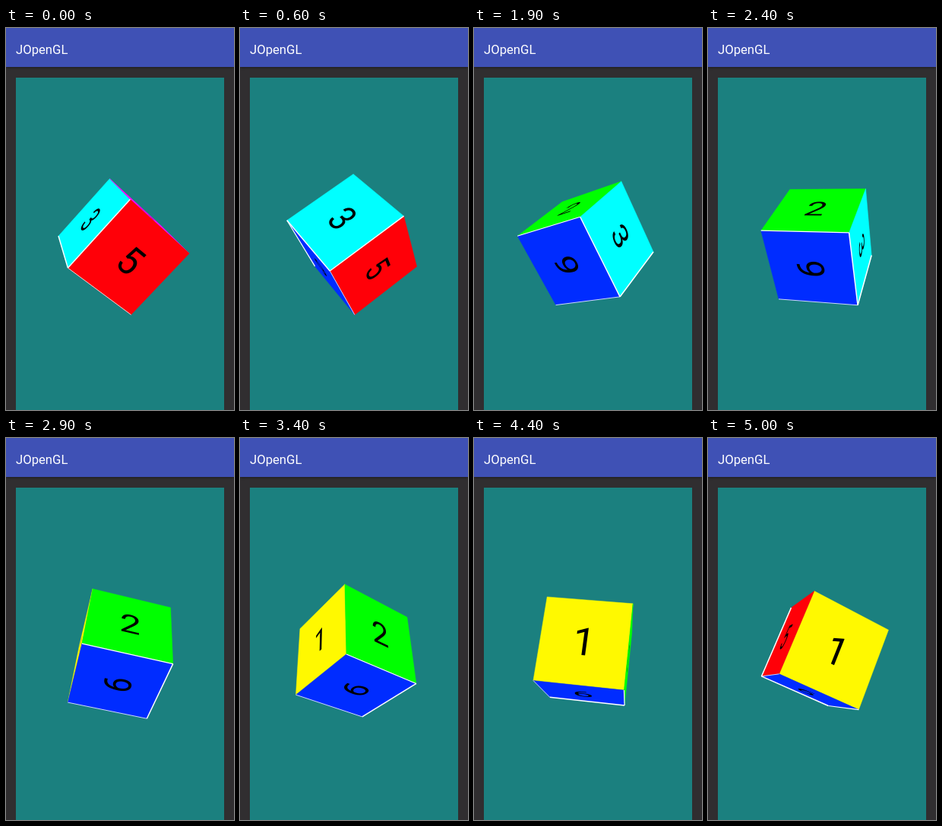
Write an HTML page with a canvas that moves like this. It is 300 px wide and 500 px high and loops after 5.1 s.

```html
<!DOCTYPE html>
<html lang="en">
<head>
<meta charset="utf-8">
<title>JOpenGL</title>
<style>
  html, body { margin: 0; width: 100%; height: 100%; overflow: hidden; background: #302e30; }
  header {
    position: absolute; left: 0; top: 0; width: 300px; height: 51px; box-sizing: border-box;
    padding-left: 13px; background: #3f51b5; color: #fff;
    font: 16.67px/58px Roboto, sans-serif; box-shadow: 0 1px 3px rgba(0, 0, 0, .4);
  }
  canvas { position: absolute; left: 13px; top: 65px; background: #1b807f; }
</style>
</head>
<body>
<header>JOpenGL</header>
<canvas id="view" width="274" height="435"></canvas>
<script>
const LOOP = 5100, STEP = 100;
const FOCAL = 532, DISTANCE = 10, CENTER = [137, 218];
const ctx = document.getElementById('view').getContext('2d');

// Orientation over time: ms, then quaternion w, x, y, z
const poses = [
  [0, .402, .035, .221, .888],
  [600, .243, .210, .383, .866],
  [1300, .047, .384, .543, .745],
  [1900, -.118, .493, .628, .591],
  [2900, -.343, .592, .700, .206],
  [3900, -.484, .518, .668, -.226],
  [5000, -.494, .267, .542, -.625]
];

// Each face: digit, colour, text direction and downward direction on the cube
const faces = [
  ['1', '#fff900', [0, 0, -1], [1, 0, 0]],
  ['2', '#00ff00', [0, 1, 0], [1, 0, 0]],
  ['3', '#00ffff', [0, 0, 1], [1, 0, 0]],
  ['4', '#ff00ff', [0, 0, -1], [0, -1, 0]],
  ['5', '#ff0008', [0, -1, 0], [1, 0, 0]],
  ['6', '#002cff', [0, 0, -1], [0, 1, 0]]
];

// Pale seams: the two face normals that meet there, and the line width
const seams = [
  [[0, 1, 0], [0, 0, 1], 1.5],
  [[1, 0, 0], [0, 1, 0], 1.5],
  [[1, 0, 0], [0, 0, -1], 1.2],
  [[1, 0, 0], [0, 0, 1], .8]
];

const cross = (a, b) => [
  a[1] * b[2] - a[2] * b[1],
  a[2] * b[0] - a[0] * b[2],
  a[0] * b[1] - a[1] * b[0]
];
const mix = (a, b, c, s, t) => a.map((v, i) => v + b[i] * s + c[i] * t);

// Cubic through the four poses around t, then normalised
function orientation(t) {
  let i = 0;
  while (i < poses.length - 2 && poses[i + 1][0] <= t) i++;
  const first = Math.max(0, Math.min(poses.length - 4, i - 1));
  const near = poses.slice(first, first + 4);
  const q = [0, 0, 0, 0];
  for (const p of near) {
    let weight = 1;
    for (const o of near) if (o !== p) weight *= (t - o[0]) / (p[0] - o[0]);
    for (let k = 0; k < 4; k++) q[k] += weight * p[k + 1];
  }
  const size = Math.hypot(...q);
  return q.map(v => v / size);
}

function rotate([w, ...axis], v) {
  const c = cross(axis, v);
  return mix(v, c, cross(axis, c), 2 * w, 2);
}

function project([x, y, z]) {
  const s = FOCAL / (DISTANCE - z);
  return [CENTER[0] + x * s, CENTER[1] + y * s];
}

const facesViewer = normal => normal[2] * DISTANCE > 1;

function drawFace(digit, color, right, down) {
  const normal = cross(right, down);
  if (!facesViewer(normal)) return;
  ctx.beginPath();
  for (const [s, t] of [[-1, -1], [1, -1], [1, 1], [-1, 1]])
    ctx.lineTo(...project(mix(normal, right, down, s, t)));
  ctx.closePath();
  ctx.fillStyle = ctx.strokeStyle = color;
  ctx.lineWidth = .5;
  ctx.fill();
  ctx.stroke();

  const h = .3;
  const slope = (s, t) => {
    const a = project(mix(normal, right, down, -s, -t));
    const b = project(mix(normal, right, down, s, t));
    return [(b[0] - a[0]) / (200 * h), (b[1] - a[1]) / (200 * h)];
  };
  ctx.save();
  ctx.transform(...slope(h, 0), ...slope(0, h), ...project(normal));
  ctx.fillStyle = '#000';
  ctx.fillText(digit, 0, 32);
  ctx.restore();
}

function drawSeam(a, b, width) {
  if (!facesViewer(a) && !facesViewer(b)) return;
  const along = cross(a, b);
  ctx.beginPath();
  ctx.moveTo(...project(mix(a, b, along, 1, -1)));
  ctx.lineTo(...project(mix(a, b, along, 1, 1)));
  ctx.strokeStyle = '#fff';
  ctx.lineWidth = width;
  ctx.stroke();
}

function frame() {
  const t = Math.floor(performance.now() % LOOP / STEP) * STEP;
  const q = orientation(t);
  const turn = v => rotate(q, v);
  ctx.clearRect(0, 0, 274, 435);
  ctx.font = '90px Roboto, sans-serif';
  ctx.textAlign = 'center';
  for (const [digit, color, right, down] of faces) drawFace(digit, color, turn(right), turn(down));
  for (const [a, b, width] of seams) drawSeam(turn(a), turn(b), width);
  requestAnimationFrame(frame);
}
frame();
</script>
</body>
</html>
```
